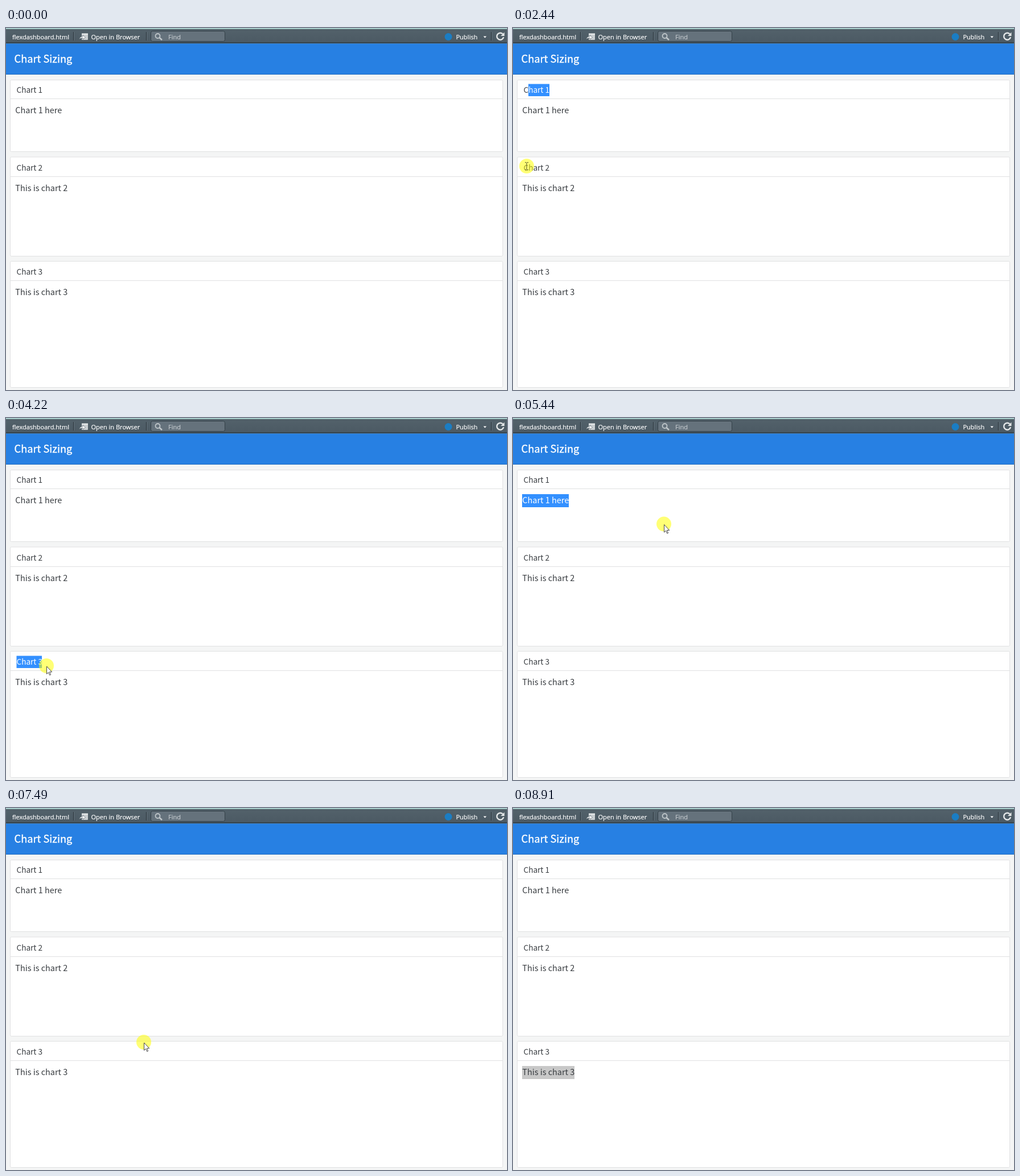
Recreate the animation shown at these times as an HTML page. Size 880x637 px, loop 9.04 s.

```html
<!DOCTYPE html>
<html lang="en">
<head>
<meta charset="utf-8">
<title>Chart Sizing</title>
<style>
  html, body { margin: 0; width: 100%; height: 100%; overflow: hidden; background: #f4f5f5; }
  svg { display: block; width: 100%; height: 100%; }
  text { white-space: pre; }
  .page { font-family: "Noto Sans CJK SC", "Noto Sans CJK JP", "Noto Sans CJK", sans-serif; }
  .bar { font: 11px "Open Sans", "Noto Sans", sans-serif; fill: #fff; }
  .bar text { stroke: currentColor; stroke-width: .2; color: #fff; }
  .bar .hint { fill: #c3c9cd; color: #c3c9cd; }
  .title { font-size: 18.2px; fill: #fff; stroke: #fff; stroke-width: .35; }
</style>
</head>
<body>
<svg viewBox="0 0 880 637">
  <defs>
    <linearGradient id="steel" x2="0" y2="1">
      <stop offset="0" stop-color="#53626b"/>
      <stop offset="1" stop-color="#4b5963"/>
    </linearGradient>
    <clipPath id="clip"><rect id="clipBox"/></clipPath>
  </defs>
  <rect width="880" height="637" fill="#f4f5f5"/>

  <g class="bar">
    <rect width="880" height="28" fill="url(#steel)"/>
    <rect width="880" height="1" fill="#9cc4c2"/>
    <rect y="1" width="880" height="1" fill="#b9dedb"/>
    <rect y="2" width="880" height="1" fill="#44535b"/>
    <rect y="25" width="880" height="2" fill="#34434e"/>
    <path d="M118.5 7V22M246.5 7V22M852.5 7V22" stroke="#273138"/>
    <path d="M119.5 7V22M247.5 7V22M853.5 7V22" stroke="#65737c"/>
    <text x="11" y="20">flexdashboard.html</text>
    <rect x="133" y="10" width="11" height="11" rx="1" fill="#c9ced1"/>
    <path d="M133 10.5h11" stroke="#eef0f1" stroke-width="2"/>
    <path d="M129 20C129.5 16 132 15 135 15V12.5L139.5 16.5 135 20V17.500C132 17.500 130.500 18 129 20Z" fill="#fff" stroke="#56646d" stroke-width=".7"/>
    <text x="149.5" y="20">Open in Browser</text>
    <rect x="254.5" y="5.5" width="130" height="18" rx="3" fill="#65727c" stroke="#333f47"/>
    <circle cx="266.5" cy="14" r="4" fill="none" stroke="#bfc6ca" stroke-width="1.8"/>
    <path d="M269.5 17L274 21" stroke="#bfc6ca" stroke-width="2.4"/>
    <text x="285" y="20" class="hint">Find</text>
    <circle cx="777" cy="15.5" r="6.5" fill="#1b7dc4"/>
    <text x="790.5" y="20">Publish</text>
    <path d="M838.5 14.5h5.5l-2.75 3z"/>
    <path d="M872.5 10.5A6 6 0 1 0 874 16" fill="none" stroke="#e4e7e8" stroke-width="2.5"/>
    <path d="M875.5 7.5V14H869Z" fill="#e4e7e8"/>
  </g>

  <g class="page">
    <rect y="27" width="880" height="55" fill="#2780e3"/>
    <rect y="27" width="880" height="1" fill="#4585c4"/>
    <rect y="81" width="880" height="1" fill="#1f6bc0"/>
    <text x="14.6" y="61" class="title">Chart Sizing</text>
    <g id="panels" fill="#fff" stroke="#e0e1e2"></g>
    <g fill="#383c40"><g id="copy"></g></g>
    <rect id="sel"/>
    <g clip-path="url(#clip)"><use id="over" href="#copy"/></g>
  </g>

  <g id="pointer">
    <circle id="halo" r="13" fill="#ff0" opacity=".54"/>
    <path id="arrow" d="M.5 1V14.500L3.500 11.700 5.700 16.500 7.600 15.700 5.500 10.900H9.700Z" fill="#fff" stroke="#333" stroke-width=".9"/>
    <path id="beam" d="M-3 -6.500H-1L0 -5.500 1 -6.500H3M0 -5.500V5.500M-3 6.500H-1L0 5.500 1 6.500H3" fill="none" stroke="#55552a"/>
  </g>
</svg>
<script>
const LOOP = 9040, STEP = 70, BLUR = 8910;
const $ = id => document.getElementById(id);
const set = (el, attrs) => { for (const k in attrs) el.setAttribute(k, attrs[k]); };
const add = (parent, tag, attrs, text = '') => {
  const el = document.createElementNS('http://www.w3.org/2000/svg', tag);
  set(el, attrs);
  el.textContent = text;
  parent.append(el);
};

// Each panel adds a selectable heading and a selectable body line.
const heads = [], bodies = [];
function addPanel(top, mid, bottom, body, right) {
  const heading = 'Chart ' + (heads.length + 1);
  add($('panels'), 'rect', { x: 7.5, y: top, width: 865, height: bottom - top, rx: 2 });
  add($('panels'), 'path', { d: `M8 ${mid}H872` });
  add($('copy'), 'text', { x: 18.5, y: mid - 10.5, 'font-size': 13.6 }, heading);
  add($('copy'), 'text', { x: 16.3, y: mid + 25.5, 'font-size': 14.45 }, body);
  heads.push({ x: 18.5, y: mid - 26, right: 64, h: 21.5 });
  bodies.push({ x: 16, y: Math.floor(mid + 9.5), right, h: 23 });
}
addPanel(91.5, 124.5, 217.5, 'Chart 1 here', 98);
addPanel(227, 261.5, 401.5, 'This is chart 2', 108);
addPanel(410.5, 444.5, 632.5, 'This is chart 3', 108);

// The pointer moves through evenly timed points; a drag also selects a line.
const gestures = [];
const move = (from, to, ...points) => gestures.push({ from, to, points });
const drag = (line, from, to, ...points) => gestures.push({ line, from, to, points });

move(460, 1160, [682, 617], [200, 230], [35, 116]);
drag(heads[0], 1420, 1620, [27, 109], [79, 109]);
move(1820, 2170, [78, 115], [37, 230]);
move(2370, 2510, [30, 240], [18, 246]);
drag(heads[1], 2580, 2920, [18, 246], [75, 250]);
move(3120, 3610, [73, 257], [14, 447]);
drag(heads[2], 3680, 4010, [18, 433], [71, 436]);
move(4080, 4970, [71, 436], [71, 436], [41, 270], [160, 97], [235, 104]);
drag(bodies[0], 5230, 5580, [244, 104], [268, 180], [253, 213]);
move(5840, 6050, [253, 218], [253, 232]);
drag(bodies[1], 6320, 6950, [255, 240], [271, 303], [260, 350], [232, 397]);
move(7150, 7290, [235, 402], [239, 412]);
drag(bodies[2], 7490, 7910, [242, 412], [305, 485], [310, 550], [295, 574]);
move(8180, 8250, [272, 574], [272, 574]);

// Position within a gesture, advancing in discrete steps
function pointerAt({ from, to, points }, t) {
  const now = Math.min(to, from + Math.floor((t - from) / STEP) * STEP);
  const u = (now - from) / (to - from) * (points.length - 1);
  const i = Math.min(Math.floor(u), points.length - 2);
  return points[i].map((v, axis) => v + (points[i + 1][axis] - v) * (u - i));
}

function selectionAt(t) {
  const g = gestures.findLast(g => g.line && t >= g.from);
  if (!g) return { x: 0, y: 0, width: 0, height: 0 };
  const { line, points: [[x0, y0]] } = g, [px, py] = pointerAt(g, t);
  const x = y0 > line.y ? Math.max(line.x, x0) : line.x;
  const end = py > line.y ? Math.min(line.right, px - 8) : x;
  return { x, y: line.y, width: Math.max(0, end - x), height: line.h };
}

const overText = (x, y) => [...heads, ...bodies].some(l =>
  x >= l.x && x <= l.right && y >= l.y && y <= l.y + l.h);
const show = (id, on) => set($(id), { visibility: on ? 'visible' : 'hidden' });

function draw(t) {
  const g = gestures.findLast(g => t >= g.from) || gestures[0];
  const [x, y] = pointerAt(g, Math.max(t, g.from));
  const visible = t >= gestures[0].from && t < gestures.at(-1).to;
  const beam = overText(x, y), box = selectionAt(t), blurred = t >= BLUR;
  set($('sel'), { ...box, fill: blurred ? '#c8c8c8' : '#3390ff' });
  set($('clipBox'), box);
  set($('over'), { fill: blurred ? '#383c40' : '#fff' });
  set($('pointer'), { transform: `translate(${x.toFixed(1)} ${y.toFixed(1)})` });
  show('halo', visible && !(t >= 3120 && t < 3180));
  show('arrow', visible && !beam);
  show('beam', visible && beam);
}

function tick() {
  draw(performance.now() % LOOP);
  requestAnimationFrame(tick);
}
tick();
</script>
</body>
</html>
```
